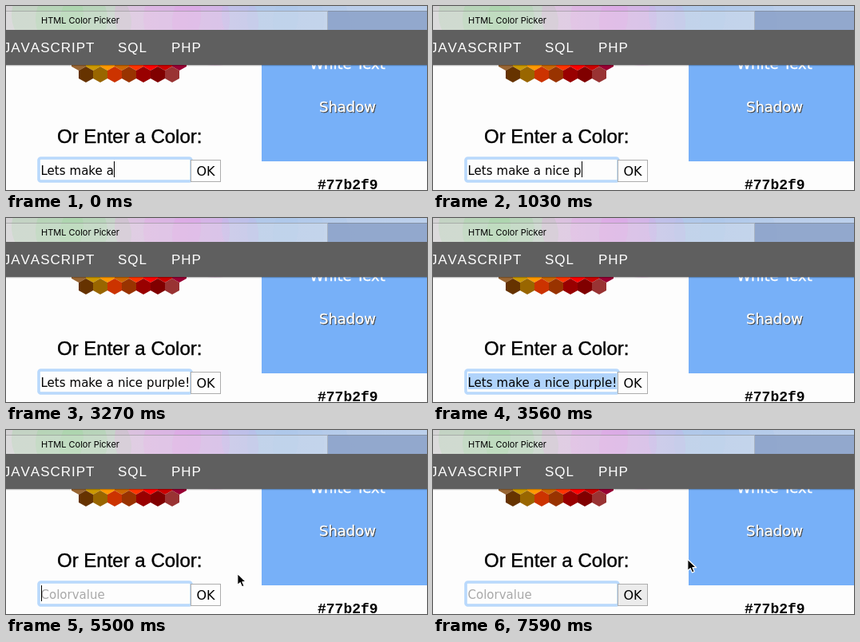
These frames come from a looping animation (527 by 231 pixels, 8000 ms). An HTML page:

```html
<!DOCTYPE html>
<html lang="en">
<head>
<meta charset="utf-8">
<title>Color picker</title>
<style>
  html, body { margin: 0; width: 100%; height: 100%; overflow: hidden; background: #fdfdfd; }
  svg { position: absolute; left: 0; top: 0; display: block; }
  .arial { font-family: "Liberation Sans", Arial, sans-serif; }
  .wide { font-family: "DejaVu Sans", Verdana, sans-serif; }
  .mono { font: bold 18px "Liberation Mono", "Courier New", monospace; }
  .tab { font: 11px Inter, sans-serif; }
  .nav { font-size: 17px; letter-spacing: 1px; font-kerning: none; fill: #fff; }
  .panel { font-size: 18px; text-anchor: middle; fill: #fff; stroke: #fff; stroke-width: .3; }
  .panel .shade { fill: #444; stroke: #444; }
  .title { font-size: 24px; stroke: #000; stroke-width: .4; }
  .field { font-size: 15px; word-spacing: .25px; }
</style>
</head>
<body>
<svg width="527" height="231" viewBox="0 0 527 231">
  <defs>
    <linearGradient id="wall">
      <stop offset="0" stop-color="#d4d2d4"/>
      <stop offset=".28" stop-color="#d8d2dc"/>
      <stop offset=".58" stop-color="#b9cbe8"/>
      <stop offset="1" stop-color="#bcd0ec"/>
    </linearGradient>
  </defs>

  <!-- browser tabs -->
  <rect width="527" height="30" fill="url(#wall)"/>
  <g id="blobs" opacity=".85"></g>
  <rect y="6" width="403" height="24" fill="#ececec" opacity=".28"/>
  <rect x="403" y="6" width="124" height="24" fill="#8ba2c8" opacity=".85"/>
  <rect y="6" width="527" height="1" fill="#777" opacity=".45"/>
  <rect x="402" y="7" width="1" height="23" fill="#777" opacity=".35"/>
  <text class="tab" x="44" y="22">HTML Color Picker</text>

  <!-- page -->
  <g id="hexes"></g>
  <rect x="320" y="70" width="207" height="125" fill="#77b0f8"/>
  <g class="wide panel">
    <text x="427.5" y="79">White Text</text>
    <text class="shade" x="428.5" y="134">Shadow</text>
    <text x="427.5" y="133">Shadow</text>
  </g>
  <text class="mono" x="390" y="230">#77b2f9</text>

  <!-- navigation -->
  <rect y="30" width="527" height="44" fill="#5f5f5f"/>
  <rect y="74" width="527" height="1" opacity=".25"/>
  <rect y="75" width="527" height="1" opacity=".06"/>
  <g class="arial nav">
    <text x="111.5" y="58" text-anchor="end">JAVASCRIPT</text>
    <text x="140" y="58">SQL</text>
    <text x="207" y="58">PHP</text>
  </g>

  <!-- form -->
  <text class="arial title" x="64" y="172">Or Enter a Color:</text>
  <rect x="41" y="191" width="191" height="29" rx="2.5" fill="#fdfdfd" stroke="#b9d9fc" stroke-width="3.6"/>
  <rect id="mark" x="44" y="195" width="186" height="20" fill="#b0d3fb"/>
  <text id="entry" class="wide field" x="43.5" y="212"></text>
  <rect id="caret" y="195" width="1" height="20"/>
  <rect id="button" x="231.5" y="193.5" width="37" height="27" stroke="#adadad"/>
  <text class="wide" x="238.5" y="213" font-size="16">OK</text>

  <path id="pointer" d="M.8.8V15.3L4.2 12.2 6.5 17.4 9.2 16.2 6.9 11.2H11.6Z" stroke="#fff" stroke-width="1.2" stroke-linejoin="round"/>
</svg>
<script>
  const LOOP = 8000, BLINK = 488;
  const SELECT = 3560, CLEAR = 4160, ENTER = 5500, MOVE = 5650;
  const full = "Lets make a nice purple!";

  // typing pace: [ms, letters], even between points
  const pace = [[0, 11], [150, 12], [290, 13], [590, 16], [740, 17], [1030, 18], [1480, 19], [2080, 23], [2370, 24]];
  const lastKey = pace.at(-1)[0];

  const $ = id => document.getElementById(id);
  const set = (el, attrs) => Object.entries(attrs).forEach(([k, v]) => el.setAttribute(k, v));

  function add(parent, tag, attrs) {
    const el = document.createElementNS("http://www.w3.org/2000/svg", tag);
    set(el, attrs);
    $(parent).append(el);
  }

  // three overlapping discs around x
  function blob(x, spread, fill) {
    for (let i = -1; i <= 1; i++) {
      add("blobs", "circle", { cx: x + i * spread, cy: 16 + i * 5, r: spread * 1.5, fill, opacity: .25 });
    }
  }

  function hexRow(left, y, colors) {
    colors.split(" ").forEach((color, i) => {
      add("hexes", "path", { d: `M${left + i * 18} ${y}l9 5v10l-9 5-9-5v-10z`, fill: "#" + color });
    });
  }

  function typed(t) {
    const i = pace.findIndex(p => p[0] > t);
    if (i < 0) return full.length;
    const [[t0, n0], [t1, n1]] = [pace[i - 1], pace[i]];
    return Math.floor(n0 + (n1 - n0) * (t - t0) / (t1 - t0));
  }

  function caretOn(t) {
    if (t < lastKey) return true;
    if (t >= SELECT && t < CLEAR) return false;
    const idle = t - (t < CLEAR ? lastKey : CLEAR);
    return Math.floor(idle / BLINK) % 2 === 0;
  }

  function draw(t) {
    const count = t < CLEAR ? typed(t) : 0;
    const entry = $("entry");
    entry.textContent = count ? full.slice(0, count) : "Colorvalue";
    set(entry, { fill: count ? "#000" : "#a9a9a9" });
    const end = count ? entry.getComputedTextLength() : 0;
    set($("caret"), { x: Math.min(229, 44 + Math.round(end)), opacity: +caretOn(t) });
    set($("mark"), { opacity: +(t >= SELECT && t < CLEAR) });
    set($("button"), { fill: t < MOVE ? "#fdfdfd" : "#ececec" });
    set($("pointer"), {
      opacity: +(t >= ENTER),
      transform: t < MOVE ? "translate(289 179.5)" : "translate(318 161.5)"
    });
  }

  blob(82, 30, "#84d884");
  blob(226, 36, "#ee88e8");
  blob(350, 32, "#a4c2ec");
  hexRow(91, 61, "996633 cc9900 ff9900 cc6600 ff3300 ff0000 cc0000 990033");
  hexRow(100, 76, "663300 996600 cc3300 993300 990000 800000 993333");

  const begin = performance.now();
  function tick() {
    draw((performance.now() - begin) % LOOP);
    requestAnimationFrame(tick);
  }
  tick();
</script>
</body>
</html>
```
